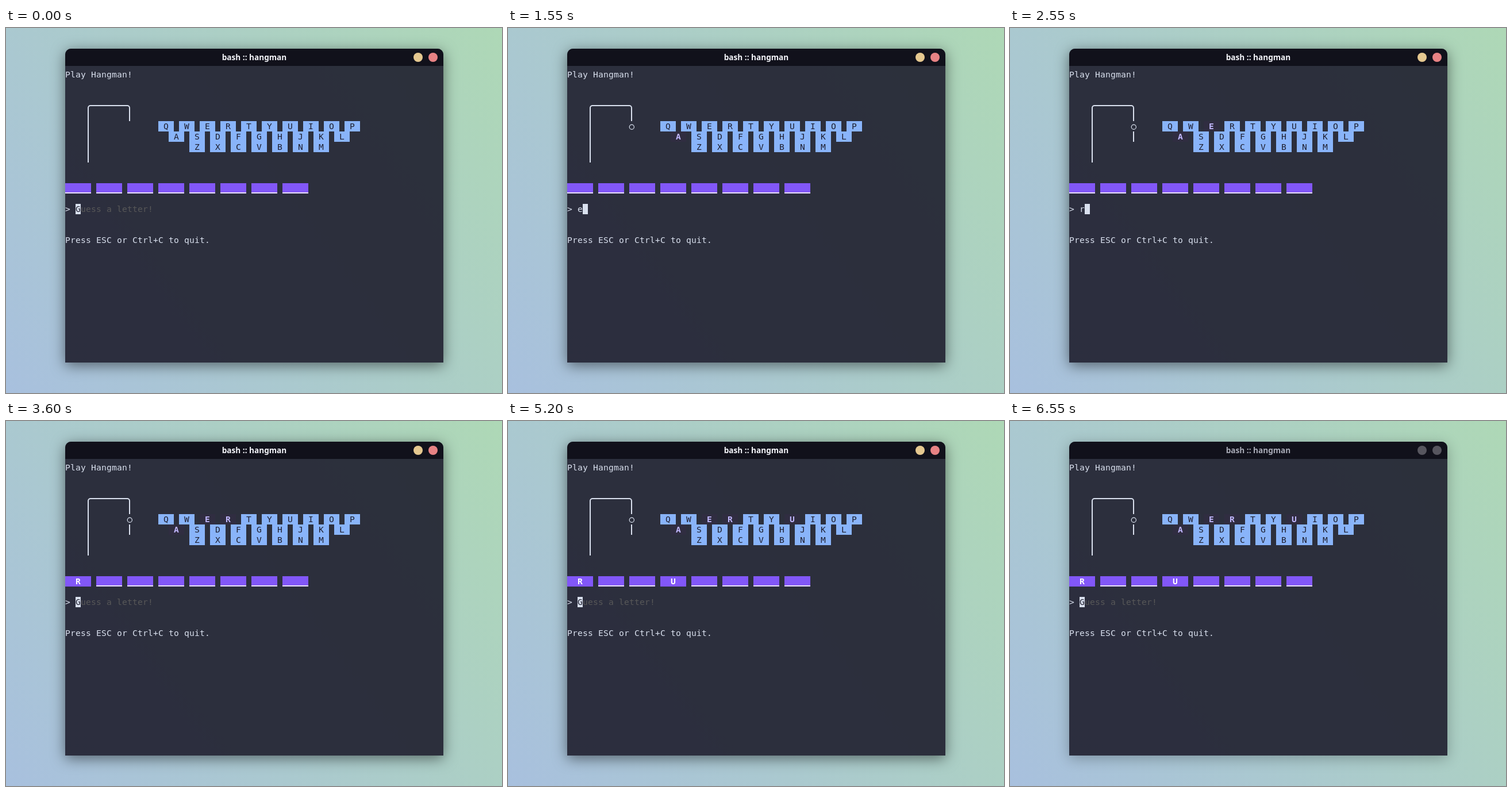
Recreate the animation shown at these times as an HTML page with a canvas. Size 863 by 635 pixels, loop 6.8 s.

```html
<!DOCTYPE html>
<html lang="en">
<head>
<meta charset="utf-8">
<title>Hangman</title>
<style>
  html, body { margin: 0; width: 100%; height: 100%; overflow: hidden; }
  body { background: #abccca; }
  #stage {
    position: absolute; left: 0; top: 0; width: 863px; height: 635px;
    background: linear-gradient(to top right, #a8c0de 0%, #abccca 50%, #aed8b6 100%);
    background: linear-gradient(53.7deg, #a8c0de, #aed8b6);
    overflow: hidden;
  }
  #win {
    position: absolute; left: 103px; top: 36px; width: 658px; height: 546px;
    border-radius: 10px 10px 0 0; background: rgba(30, 30, 46, .9);
    box-shadow: 0 5px 24px rgba(0, 0, 0, .5);
  }
  #bar {
    height: 30px; border-radius: 10px 10px 0 0; background: #11111b; color: #f4f5fa;
    font: bold 13.6px/30px "Noto Sans", "Open Sans", sans-serif; text-align: center;
  }
  #bar i { position: absolute; top: 7px; width: 16px; height: 16px; border-radius: 50%; }
  .min { left: 606px; background: #e5c890; }
  .close { left: 632px; background: #e78284; }
  .idle#win { box-shadow: 0 5px 24px rgba(0, 0, 0, .27); }
  .idle #bar { color: #a9abb7; }
  .idle #bar i { background: #57565f; }
  canvas { position: absolute; left: 0; top: 0; }
</style>
</head>
<body>
<div id="stage">
  <div id="win"><div id="bar">bash :: hangman<i class="min"></i><i class="close"></i></div></div>
  <canvas id="term" width="863" height="635"></canvas>
</div>
<script>
const LOOP = 6800, CELL = 9, ROW = 18, LEFT = 103, TOP = 72;
const FG = '#d9e0ee', DARK = '#1e1e2e', KEY = '#89b4fa', USED = '#302d41', LILAC = '#c0b7fd';
const PURPLE = '#8257f8', HINT = '#585858';
const WORD = 'R  U    ';
const KEYS = [['QWERTYUIOP', 18], ['ASDFGHJKL', 20], ['ZXCVBNM', 24]];
// letter, time typed, time entered
const GUESSES = [['a', 450, 850], ['e', 1550, 1750], ['r', 2550, 3000], ['u', 4150, 4500]];
const CURSOR_OFF = [[1000, 1550], [1850, 2400], [3050, 3600], [4700, 5200], [5750, 6300]];

const win = document.getElementById('win');
const g = document.getElementById('term').getContext('2d');
const within = (t, a, b) => t >= a && t < b;

function box(col, row, cells, color) {
  g.fillStyle = color;
  g.fillRect(LEFT + col * CELL, TOP + row * ROW, cells * CELL, ROW);
}

function text(str, col, row, color = FG, weight = 'normal') {
  g.font = `${weight} 14.67px "DejaVu Sans Mono", monospace`;
  g.fillStyle = color;
  [...str].forEach((c, i) => g.fillText(c, LEFT + (col + i) * CELL, TOP + row * ROW + 14));
}

function cursor(col, letter = '') {
  box(col, 13, 1, FG);
  text(letter, col, 13, DARK);
}

function gallows(misses) {
  g.strokeStyle = FG;
  g.lineWidth = 2;
  g.beginPath();
  g.moveTo(143, 234);
  g.arcTo(143, 135, 215, 135, 4);
  g.arcTo(215, 135, 215, 162, 4);
  g.lineTo(215, 162);
  if (misses > 1) {
    g.moveTo(215, 180);
    g.lineTo(215, 198);
  }
  g.stroke();
  if (misses > 0) {
    g.lineWidth = 1.2;
    g.beginPath();
    g.arc(215.3, 172.3, 4.1, 0, 7);
    g.stroke();
  }
}

function keyboard(used) {
  KEYS.forEach(([letters, start], r) => [...letters].forEach((c, i) => {
    const col = start + i * 4, hit = used.includes(c);
    box(col, r + 5, 3, hit ? USED : KEY);
    text(c, col + 1, r + 5, hit ? LILAC : DARK, hit ? 'bold' : 'normal');
  }));
}

function slots(used) {
  [...WORD].forEach((c, i) => {
    box(i * 6, 11, 5, PURPLE);
    if (used.includes(c)) text(c, i * 6 + 2, 11, '#fff', 'bold');
    else {
      g.fillStyle = '#fff';
      g.fillRect(LEFT + i * 54, 286, 45, 1.6);
    }
  });
}

function prompt(t) {
  text('>', 0, 13);
  const typed = GUESSES.find(([, from, to]) => within(t, from, to));
  if (typed) {
    text(typed[0], 2, 13);
    cursor(3);
  } else {
    text('Guess a letter!', 2, 13, HINT);
    if (!CURSOR_OFF.some(([a, b]) => within(t, a, b))) cursor(2, 'G');
  }
}

function draw(t) {
  const used = GUESSES.filter(([, , at]) => t >= at).map(([c]) => c.toUpperCase());
  win.className = t >= 6550 ? 'idle' : '';
  g.clearRect(0, 0, 863, 635);
  text('Play Hangman!', 0, 0);
  gallows(used.filter(c => !WORD.includes(c)).length);
  keyboard(used);
  slots(used);
  prompt(t);
  text('Press ESC or Ctrl+C to quit.', 0, 16);
}

const start = performance.now();
function tick() {
  draw((performance.now() - start) % LOOP);
  requestAnimationFrame(tick);
}
tick();
</script>
</body>
</html>
```
